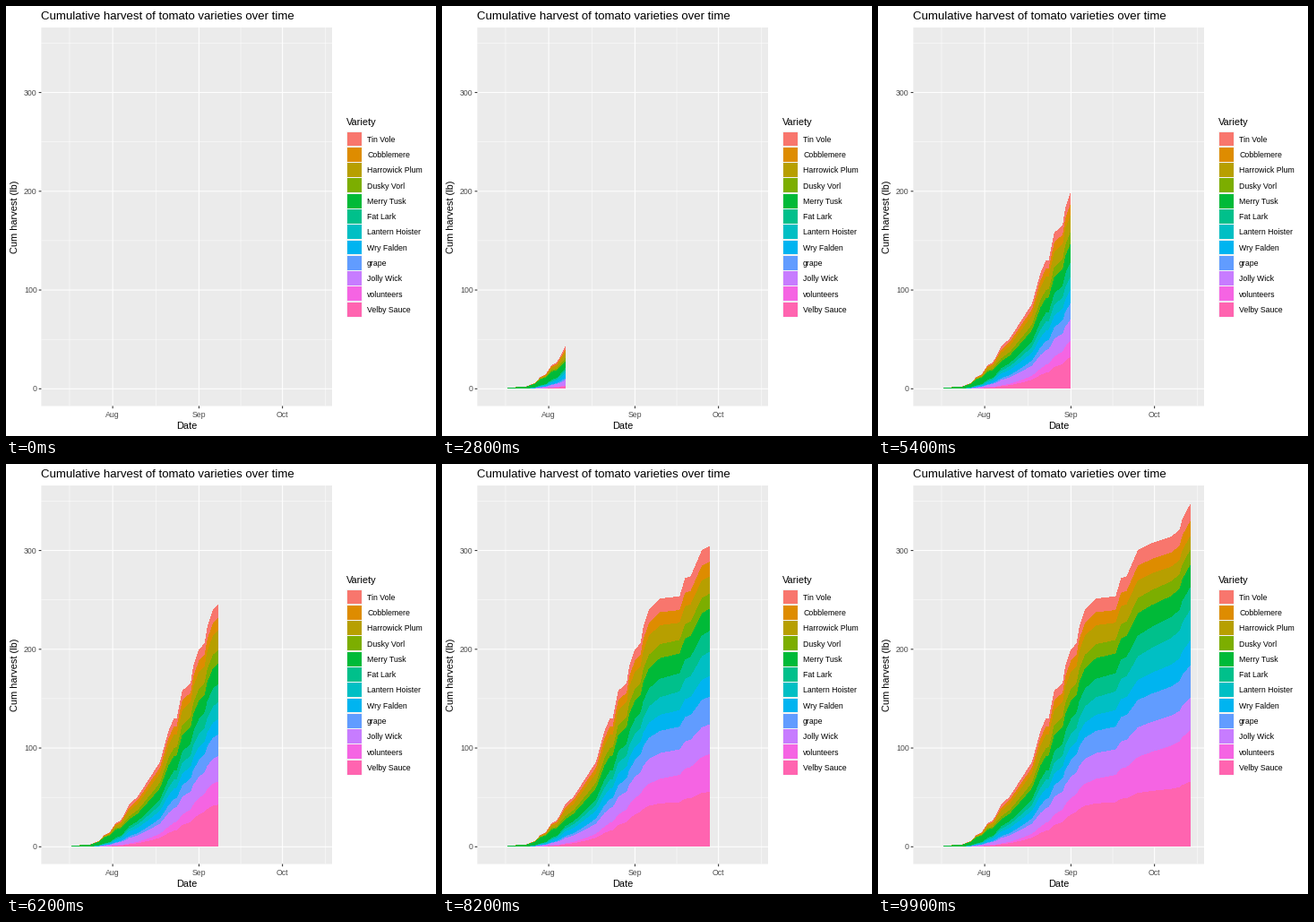
Animation of 480 by 480 pixels, one loop 10000 ms. Source, as a matplotlib script:

```python
import numpy as np
import matplotlib.pyplot as plt
from matplotlib.animation import FuncAnimation
from matplotlib.patches import Rectangle

SIZE, DPI = 480, 80
PT = 72 / DPI                       # points per pixel
FRAMES, INTERVAL = 100, 100
LEFT, RIGHT, TOP, BOTTOM = 39.4, 364, 24, 446.5
BASE, PER_LB = 427.3, 1.1025        # pixel row of 0 lb, pixels per lb
X0, PER_DAY = 72.5, 3.107           # day 0 is the first picking, 17 July
LEAD, LAST = 6, 89                  # empty days before it, last day
KEY = 17.28                         # legend row height

plt.rcParams["font.family"] = "Liberation Sans"

# Bends of the total harvest: day, pounds.
HARVEST = [(0, 1), (7, 2.5), (10, 6), (12, 12), (14, 15), (16, 24), (18, 27),
           (21, 43), (24, 51), (32, 86), (35, 117), (37, 130), (38, 130),
           (40, 158), (43, 166), (44, 184), (46, 200), (48, 206), (49, 223),
           (51, 240), (55, 251.5), (62, 253.5), (64, 272), (66, 274),
           (70, 300.5), (75, 307.5), (82, 314), (85, 321), (86, 332), (89, 348)]

# Share of the harvest early, midway and at the end; top band first.
SHARE_DAYS = [0, 21, 48, LAST]
FIRST = "Merry Tusk"                # the only variety ripe on day 0
BANDS = [
    ("Tin Vole", "#F8766D", (7, 5.8, 5)),
    ("Cobblemere", "#DE8C00", (8, 5.5, 4.4)),
    ("Harrowick Plum", "#B79F00", (13, 8.5, 4)),
    ("Dusky Vorl", "#7CAE00", (7, 6, 4.4)),
    (FIRST, "#00BA38", (16, 8.8, 6.5)),
    ("Fat Lark", "#00C08B", (6, 7.8, 6.5)),
    ("Lantern Hoister", "#00BFC4", (7, 6.8, 9)),
    ("Wry Falden", "#00B4F0", (11, 6.4, 7.2)),
    ("grape", "#619CFF", (4, 9, 9.5)),
    ("Jolly Wick", "#C77CFF", (13, 10.8, 9.5)),
    ("volunteers", "#F564E3", (2, 9, 15)),
    ("Velby Sauce", "#FF64B0", (6, 17.5, 19)),
]


def day_x(day):
    return X0 + PER_DAY * day


def lb_y(lb):
    return BASE - PER_LB * lb


# Whole pixel columns and rows keep the band edges hard.
columns = np.arange(round(day_x(0.1)), round(day_x(LAST)) + 1)
centres = columns[:-1] + 0.5
days = (centres - X0) / PER_DAY
total = np.interp(days, *zip(*HARVEST))
shares = np.array([np.interp(days, SHARE_DAYS, (100 * (name == FIRST), *s))
                   for name, _, s in BANDS])
shares /= shares.sum(axis=0)
stacked = np.cumsum(shares[::-1], axis=0)[::-1] * total
floor = round(BASE)
tops = np.rint(lb_y(stacked))

# Every day falls on a whole frame; the few frames left over lie halfway.
span = np.arange(LEAD + LAST + 1)
day_frames = np.floor(span * (FRAMES - 1) / span[-1] + 0.52)

fig = plt.figure(figsize=(SIZE / DPI, SIZE / DPI), dpi=DPI, facecolor="white")
ax = fig.add_axes([0, 0, 1, 1])
ax.set_xlim(0, SIZE)
ax.set_ylim(SIZE, 0)
ax.axis("off")


def rect(x0, y0, x1, y1, color):
    ax.add_patch(Rectangle((x0, y0), x1 - x0, y1 - y0, fc=color, lw=0,
                           snap=False))


def line(xs, ys, color, width):
    ax.plot(xs, ys, color=color, lw=width * PT, solid_capstyle="butt",
            snap=False, zorder=1.5)


def label(x, y, s, size, color="black", va="baseline", **kw):
    ax.text(x, y, s, fontsize=size * PT, color=color, va=va, **kw)


rect(LEFT, TOP, RIGHT, BOTTOM, "#EBEBEB")
for lb in (50, 150, 250, 350):
    line([LEFT, RIGHT], [lb_y(lb)] * 2, "white", 0.53)
for day in (-0.5, 30.5, 61, 91.5):
    line([day_x(day)] * 2, [TOP, BOTTOM], "white", 0.53)
for lb in (0, 100, 200, 300):
    y = lb_y(lb)
    line([LEFT, RIGHT], [y, y], "white", 1.07)
    line([LEFT - 2.75, LEFT], [y, y], "#333333", 1.07)
    label(34.6, y + 3.2, str(lb), 8.8, "#4D4D4D", ha="right")
for day, month in ((15, "Aug"), (46, "Sep"), (76, "Oct")):
    x = day_x(day)
    line([x, x], [TOP, BOTTOM], "white", 1.07)
    line([x, x], [BOTTOM, BOTTOM + 2.75], "#333333", 1.07)
    label(x, 459, month, 8.8, "#4D4D4D", ha="center")

label(39.2, 15, "Cumulative harvest of tomato varieties over time", 13.2)
label(201.7, 472, "Date", 11, ha="center")
label(10.3, 235.2, "Cum harvest (lb)", 11, va="center", ha="center", rotation=90)

label(380, 133, "Variety", 11)
areas = []
for k, (name, color, _) in enumerate(BANDS):
    y = 139.9 + k * KEY
    rect(380.2, y, 380.2 + KEY, y + KEY, "#F2F2F2")
    rect(381, round(y + 0.7), 397, round(y + KEY - 0.7), color)
    label(403, y + KEY / 2 + 3.2, name, 8.8)
    # each band reaches the floor and is covered by the ones below it
    areas.append(ax.stairs(tops[k], columns, baseline=floor, fill=True,
                           color=color, lw=0, snap=False, zorder=2))


def draw(frame):
    now = np.interp(frame, day_frames, span) - LEAD
    ripe = (now > 0) & (centres < round(day_x(now)))
    for area, top in zip(areas, tops):
        area.set_data(values=np.where(ripe, top, floor))
    return areas


anim = FuncAnimation(fig, draw, frames=FRAMES, interval=INTERVAL,
                     repeat=True, repeat_delay=0, blit=False)
plt.show()
```
